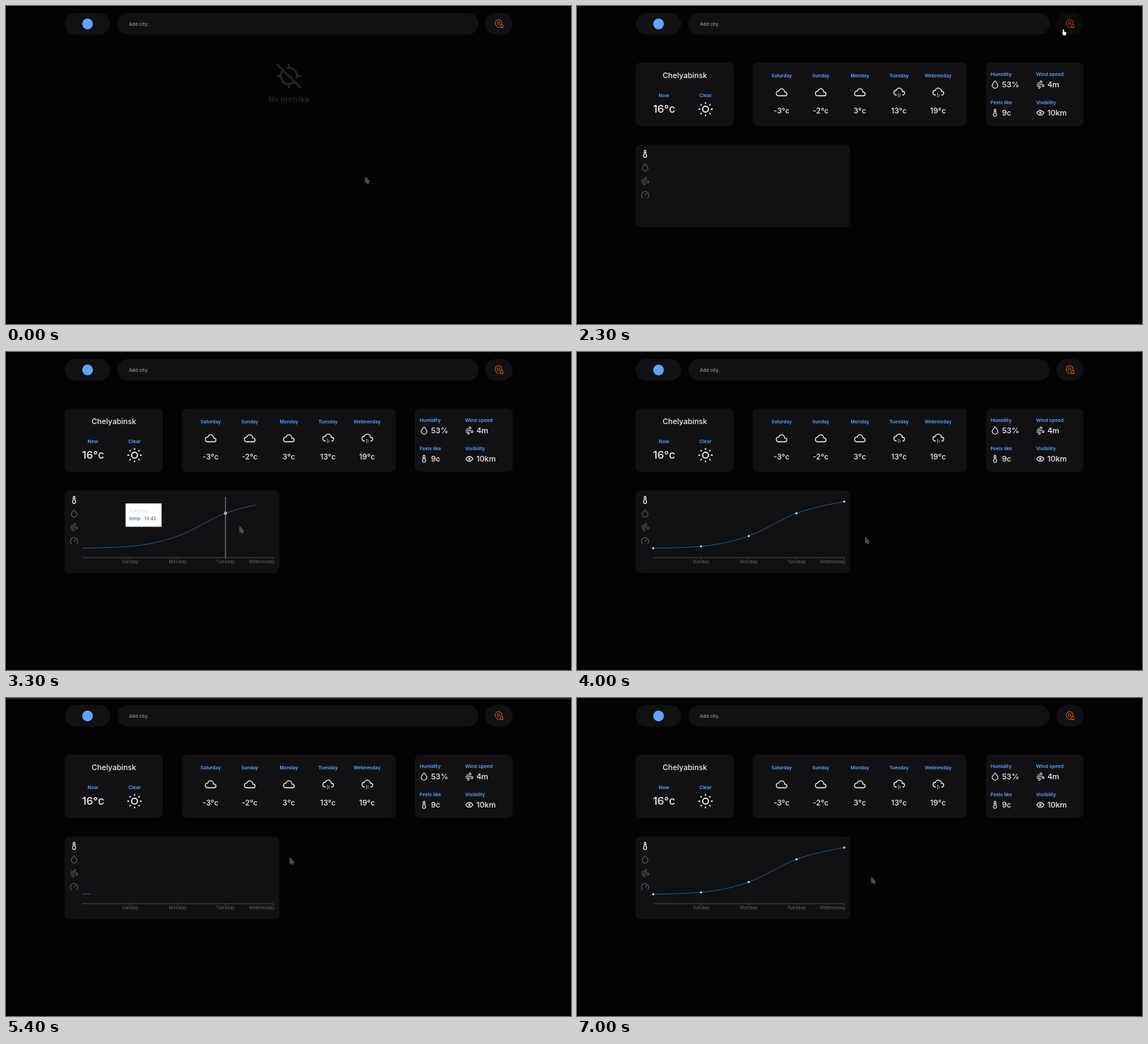
These frames come from a looping animation (800 px wide and 450 px high, 7.6 s). An HTML page:

```html
<!DOCTYPE html>
<html lang="en">
<head>
<meta charset="utf-8">
<title>Weather dashboard</title>
<style>
  html, body { margin: 0; width: 100%; height: 100%; overflow: hidden; background: #030303; }
  svg { display: block; width: 800px; height: 450px; font-family: Inter, "Noto Sans", sans-serif; }
  .icon { fill: none; stroke-linecap: round; stroke-linejoin: round; }
</style>
</head>
<body>
<svg id="stage" viewBox="0 0 800 450"></svg>
<script>
const LOOP = 7600, STEP = 100, DRAW_TIME = 1500;
const BLUE = '#60a5fa', WHITE = '#f0f0f0', GREY = '#666', CARD = '#111113', BG = '#030303';
const stage = document.getElementById('stage');

function add(parent, tag, attrs, content) {
  const node = document.createElementNS('http://www.w3.org/2000/svg', tag);
  set(node, attrs);
  if (content) node.textContent = content;
  parent.appendChild(node);
  return node;
}
function set(node, attrs) {
  for (const key in attrs) node.setAttribute(key, attrs[key]);
}
function show(node, visible) {
  node.style.display = visible ? '' : 'none';
}
function group(parent = stage) {
  return add(parent, 'g', {});
}
function box(parent, x, y, width, height, rx, fill = CARD) {
  return add(parent, 'rect', { x, y, width, height, rx, fill });
}
function label(parent, x, y, content, size, fill, weight = 500, anchor = 'middle') {
  return add(parent, 'text', { x, y, 'font-size': size, fill, 'font-weight': weight, 'text-anchor': anchor }, content);
}

// Icons live on a 24-unit grid.
const ICONS = {
  cloud: 'M6.66 18c-2.57 0-4.66-2-4.66-4.48s2.09-4.48 4.66-4.48c.39-1.76 1.79-3.2 3.67-3.77 1.88-.57 3.96-.2 5.45 1s2.16 3 1.77 4.76h.99c1.91 0 3.46 1.56 3.46 3.49S20.45 18 18.54 18z',
  snow: 'M7 18a4.6 4.4 0 0 1 0-9a5 4.5 0 0 1 11 2h1a3.5 3.5 0 0 1 0 7M11 15v.01M11 18v.01M11 21v.01M14 16.5v.01M14 19.5v.01',
  sun: 'M8 12a4 4 0 1 0 8 0a4 4 0 1 0-8 0M3 12h1M12 3v1M20 12h1M12 20v1M5.6 5.6l.7.7M18.4 5.6l-.7.7M17.7 17.7l.7.7M6.3 17.7l-.7.7',
  drop: 'M7.5 19.4c2.6 2.1 6.4 2.1 9 0s3.26-5.7 1.56-8.54l-4.89-7.26a1.4 1.4 0 0 0-2.34 0l-4.9 7.26c-1.69 2.84-1.03 6.44 1.57 8.54z',
  wind: 'M5 8h8.5a2.5 2.5 0 1 0-2.34-3.24M3 12h15.5a2.5 2.5 0 1 1-2.34 3.24M4 16h5.5a2.5 2.5 0 1 1-2.34 3.24',
  thermo: 'M10 13.5a4 4 0 1 0 4 0V5a2 2 0 0 0-4 0zM10 9h4',
  eye: 'M10 12a2 2 0 1 0 4 0a2 2 0 0 0-4 0M21 12c-2.4 4-5.4 6-9 6s-6.6-2-9-6c2.4-4 5.4-6 9-6s6.6 2 9 6',
  gauge: 'M5.64 19.36a9 9 0 1 1 12.73 0M16 9l-4 4',
  pin: 'M9 11a3 3 0 1 0 6 0a3 3 0 0 0-6 0M12 21.5a2 2 0 0 1-1.4-.6l-4.24-4.24a8 8 0 1 1 13.3-3.3M15.5 17l3.5-2.8 3.5 2.8v4.7h-7zM19 21.5v-2'
};
function icon(parent, name, cx, cy, scale, stroke = WHITE, width = 2) {
  return add(parent, 'path', {
    d: ICONS[name], class: 'icon', stroke, 'stroke-width': width,
    transform: `translate(${cx} ${cy}) scale(${scale}) translate(-12 -12)`
  });
}

// Header
box(stage, 83, 10, 64.5, 30.5, 15.2);
add(stage, 'circle', { cx: 115.5, cy: 25.3, r: 7.6, fill: BLUE });
box(stage, 157.5, 10, 511.5, 30.5, 15.2);
label(stage, 174, 27.7, 'Add city..', 6.6, '#9a9a9a', 500, 'start');
const locate = box(stage, 678.5, 10, 39, 30.5, 15.2);
const pin = icon(stage, 'pin', 697.4, 24.7, .6, '#c2561f', 1.7);

// Empty state
const empty = group();
const crosshair = add(empty, 'g', { class: 'icon', stroke: '#222', 'stroke-width': 3.2, transform: 'translate(400.5 99)' });
add(crosshair, 'path', { d: 'M-11.5 0a11.5 11.5 0 1 0 23 0a11.5 11.5 0 1 0-23 0M0-16v4M0 12v4M-16 0h4M12 0h4' });
add(crosshair, 'path', { d: 'M-13.5-17.5L18 14', stroke: BG, 'stroke-width': 4 });
add(crosshair, 'path', { d: 'M-16-16L16 16' });
label(empty, 400.5, 136.2, 'No metrika', 10.9, '#222', 700);

// Dashboard cards
const board = group();
box(board, 83, 80, 139, 89.5, 7);
box(board, 248.7, 80, 303.5, 89.5, 7);
box(board, 579, 80, 138.5, 89.5, 7);
box(board, 83, 196, 304, 117, 7);

label(board, 152.7, 102, 'Chelyabinsk', 10.7, WHITE);
label(board, 123, 129, 'Now', 6.8, BLUE, 600);
label(board, 182, 129.3, 'Clear', 6.8, BLUE, 600);
label(board, 123.3, 151.2, '16°c', 15.2, WHITE);
icon(board, 'sun', 182, 146, 1.04, WHITE, 1.7);

const DAYS = ['Saturday', 'Sunday', 'Monday', 'Tuesday', 'Webnesday'];
['-3', '-2', '3', '13', '19'].forEach((degrees, i) => {
  const x = 289.7 + i * 55.4;
  label(board, x, 101.3, DAYS[i], 6.7, BLUE, 600);
  icon(board, i < 3 ? 'cloud' : 'snow', x, i < 3 ? 122.5 : 121.5, .75, WHITE, 1.7);
  label(board, x, 152, degrees + '°c', 10.8, WHITE);
});

[['Humidity', 'drop', '53%'], ['Wind speed', 'wind', '4m'],
 ['Feels like', 'thermo', '9c'], ['Visibility', 'eye', '10km']].forEach(([title, name, value], i) => {
  const x = 585.7 + (i % 2) * 64.2, y = 98.7 + (i >> 1) * 40;
  label(board, x, y, title, 6.8, BLUE, 600, 'start');
  icon(board, name, x + 6.2, y + 12.5, .56);
  label(board, x + 16, y + 16.2, value, 11, WHITE, 500, 'start');
});
['thermo', 'drop', 'wind', 'gauge'].forEach((name, i) =>
  icon(board, name, 96.4, 209.2 + i * 19.3, .57, i ? '#606060' : WHITE, i ? 1.8 : 2.1));

// Chart
const STRIDE = 67.6;
const points = [277.7, 275, 260.5, 228.2, 211.7].map((y, i) => [108 + i * STRIDE, y]);

function monotonePath(pts) {
  const slopes = pts.slice(1).map((p, i) => (p[1] - pts[i][1]) / STRIDE);
  const tangents = pts.map((_, i) => {
    const a = slopes[i - 1], b = slopes[i];
    if (a === undefined || b === undefined) return 0;
    return (Math.sign(a) + Math.sign(b)) * Math.min(Math.abs(a), Math.abs(b), Math.abs(a + b) / 4);
  });
  const last = pts.length - 1;
  tangents[0] = (3 * slopes[0] - tangents[1]) / 2;
  tangents[last] = (3 * slopes[last - 1] - tangents[last - 1]) / 2;
  const third = STRIDE / 3;
  return pts.reduce((d, [x, y], i) => {
    if (!i) return `M${x} ${y}`;
    const [px, py] = pts[i - 1];
    return d + `C${px + third} ${py + third * tangents[i - 1]} ${x - third} ${y - third * tangents[i]} ${x} ${y}`;
  }, '');
}

const chart = group(board);
add(chart, 'path', { d: 'M108 291H378.4' + points.map(p => `M${p[0]} 291v2.6`).slice(1).join(''), stroke: '#5c5c5c', 'stroke-width': .7, fill: 'none' });
points.slice(1).forEach(([x], i) => i < 3
  ? label(chart, x, 299, DAYS[i + 1], 6.6, GREY, 400)
  : label(chart, 380.4, 299, DAYS[i + 1], 6.6, GREY, 400, 'end'));
const line = add(chart, 'path', { d: monotonePath(points), fill: 'none', stroke: '#2d6a9c', 'stroke-width': .8, pathLength: 1 });
const dots = group(chart);
points.forEach(([cx, cy]) => add(dots, 'circle', { cx, cy, r: 1.3, fill: '#fff', stroke: '#8ebcec', 'stroke-width': .4 }));

const hover = group(chart);
const [hoverX, hoverY] = points[3];
add(hover, 'path', { d: `M${hoverX} 205V291`, stroke: '#b0b0b0', 'stroke-width': .8 });
add(hover, 'circle', { cx: hoverX, cy: hoverY, r: 1.8, fill: '#3b76c4', stroke: '#fff', 'stroke-width': 1 });
const tooltip = group(hover);
box(tooltip, 0, 0, 51, 33, 0, '#fff');
label(tooltip, 5, 12.3, DAYS[3], 6.6, '#dcdcec', 500, 'start');
label(tooltip, 5, 24, 'temp : 13.42', 6.6, '#4068b4', 500, 'start');

const bar = box(stage, 0, 0, 0, 1.6, 0, '#f2c028');
const arrow = add(stage, 'path', { d: 'M0 0v8.6l2-1.7 1.3 2.9 1.4-.6-1.3-2.8h2.6z', fill: '#484848', stroke: '#777', 'stroke-width': .6 });
const hand = add(stage, 'path', { d: 'M1 .8q.8-1 1.5 0v3l2.6.6q.9.3.7 1.2l-.6 3.4h-3.5l-2-3.2q.1-.9 1.3-.2z', fill: '#fff' });

// Keyframes: [time, ...values]
const CURSOR = [
  [0, 509, 242], [800, 605, 137], [1400, 692.3, 31], [1500, 692.3, 31], [1600, 695, 30.5], [1700, 697, 30.5],
  [1900, 697, 30.5], [2300, 687, 32.5], [2600, 682, 37], [2800, 610, 98], [3000, 460, 195],
  [3200, 343, 245], [3300, 331, 247], [3400, 342, 251], [3500, 392, 257], [4300, 418, 265],
  [5000, 430, 271], [5200, 418, 250], [5400, 402, 226], [5900, 404, 234], [6700, 417, 253.5]
];
const TOOLTIP = [[3200, 124, 205], [3300, 169.3, 214.3], [3400, 215, 226]];
const BAR = [[4800, 0, 1], [5000, 81, 1], [5100, 698, 1], [5200, 800, 1], [5300, 800, .6], [5400, 800, .16], [5500, 800, 0]];

function sample(keys, t) {
  if (t <= keys[0][0]) return keys[0].slice(1);
  const next = keys.findIndex(k => k[0] > t);
  if (next < 0) return keys[keys.length - 1].slice(1);
  const a = keys[next - 1], b = keys[next], f = (t - a[0]) / (b[0] - a[0]);
  return a.slice(1).map((v, i) => v + (b[i + 1] - v) * f);
}

// Cubic-bezier(.25, .1, .25, 1), solved by bisection.
function ease(x) {
  if (x <= 0 || x >= 1) return x <= 0 ? 0 : 1;
  let low = 0, high = 1, s = .5;
  for (let i = 0; i < 24; i++) {
    s = (low + high) / 2;
    if (.75 * s * (1 - s) + s ** 3 < x) low = s; else high = s;
  }
  return .3 * s * (1 - s) ** 2 + 3 * s * s * (1 - s) + s ** 3;
}

function render(time) {
  const t = Math.floor(time % LOOP / STEP) * STEP;

  show(empty, t < 2000);
  show(board, t >= 2000);

  const drawStart = t < 5100 ? 2340 : 5312;
  const progress = (t - drawStart) / DRAW_TIME;
  const drawn = ease(progress);
  show(chart, progress >= 0);
  show(line, drawn > 0);
  set(line, { 'stroke-dasharray': drawn < 1 ? `${drawn} 2` : 'none' });
  show(dots, progress >= 1);

  show(hover, t >= 3200 && t <= 3400);
  set(tooltip, { transform: `translate(${sample(TOOLTIP, t)})` });

  const [width, opacity] = sample(BAR, t);
  set(bar, { width, opacity });

  const [x, y] = sample(CURSOR, t);
  const hovering = x > 678 && y < 40;
  show(hand, hovering);
  show(arrow, !hovering);
  set(hovering ? hand : arrow, { transform: `translate(${x} ${y})` });
  set(locate, { fill: hovering ? '#0b0b0c' : CARD });
  set(pin, { stroke: hovering ? '#94400f' : '#c2561f' });
}

const start = performance.now();
function tick() {
  render(performance.now() - start);
  requestAnimationFrame(tick);
}
tick();
</script>
</body>
</html>
```
